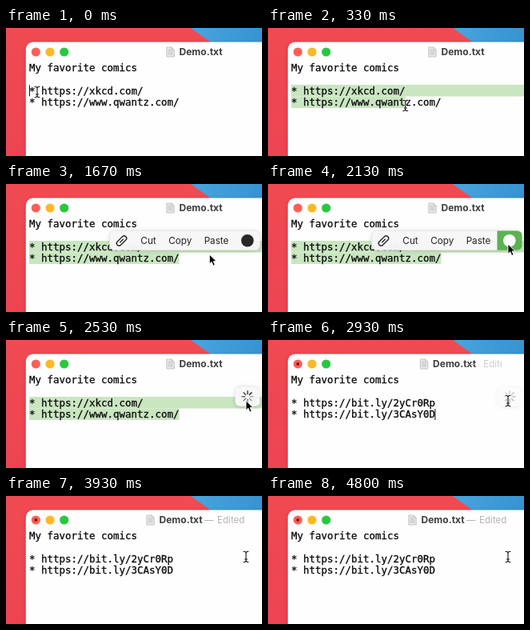
Write an HTML page that moves like this. It is 320 by 160 pixels and loops after 4.87 s.

```html
<!DOCTYPE html>
<html lang="en">
<head>
<meta charset="utf-8">
<title>Shorten links in a text file</title>
<style>
  html, body { margin: 0; width: 100%; height: 100%; overflow: hidden; background: #fff; }
  svg { display: block; width: 100vw; height: 100vh; }
  text { white-space: pre; }
  .mono { font: 12.46px "DejaVu Sans Mono", monospace; fill: #0a0a0a; stroke: #0a0a0a; stroke-width: .3px; }
  .title { font: 700 12px Inter, sans-serif; fill: #3d3d3d; }
  .edited { font: 400 11.6px Inter, sans-serif; fill: #b3b3b3; }
  .menu { font: 400 11.7px Inter, sans-serif; fill: #1c1c1c; text-anchor: middle; }
</style>
</head>
<body>
<svg viewBox="0 0 320 160">
  <defs>
    <linearGradient id="red" x1="0" y1="0" x2="0" y2="1">
      <stop offset="0" stop-color="#f04a52"/>
      <stop offset="1" stop-color="#ee4452"/>
    </linearGradient>
    <linearGradient id="blue" x1="0" y1="0" x2="1" y2="0">
      <stop offset="0" stop-color="#48a5dc"/>
      <stop offset="1" stop-color="#3793d3"/>
    </linearGradient>
    <filter id="soft" x="-20%" y="-40%" width="140%" height="190%">
      <feGaussianBlur stdDeviation="3"/>
    </filter>
    <clipPath id="editedClip"><rect id="editedBox" y="18" height="24"/></clipPath>
  </defs>

  <rect width="320" height="160" fill="url(#red)"/>
  <path d="M231 0H320V30H273Z" fill="url(#blue)"/>
  <rect x="25" y="19" width="330" height="180" rx="10" fill="#000" opacity=".18" filter="url(#soft)"/>
  <rect x="24.8" y="17.6" width="330" height="180" rx="9" fill="#fefefe"/>

  <circle cx="37.3" cy="30" r="5.6" fill="#fe5f57"/>
  <circle cx="55" cy="30" r="5.6" fill="#fdb827"/>
  <circle cx="72.7" cy="30" r="5.6" fill="#28c840"/>
  <circle id="dirty" cx="37.3" cy="30" r="1.9" fill="#7d1410"/>

  <g id="title">
    <path d="M.8 24H7L10.2 27.2V36H.8Z" fill="#ececec" stroke="#b5b5b5" stroke-width=".8"/>
    <path d="M7 24V27.2H10.2" fill="none" stroke="#b5b5b5" stroke-width=".7"/>
    <path d="M2.5 27H6M2.5 29H8.5M2.5 31H8.5M2.5 33H8.5" stroke="#aaa" stroke-width=".7"/>
    <text class="title" x="16.5" y="34.3">Demo.txt</text>
  </g>
  <g id="suffix" class="edited" clip-path="url(#editedClip)">
    <text x="248" y="34.3">—</text>
    <text id="edited" y="34.3">Edited</text>
  </g>

  <g fill="#c9e6c0">
    <rect id="selA" x="29" y="71" height="14.5"/>
    <rect id="selB" x="29" y="85.5" height="14.5"/>
  </g>
  <text class="mono" x="29" y="54">My favorite comics</text>
  <text class="mono" id="lineA" x="29" y="82.7"></text>
  <text class="mono" id="lineB" x="29" y="97"></text>
  <rect id="caret" width="1" height="14" fill="#111"/>

  <g id="popup">
    <rect x="130" y="59.5" width="187" height="24" rx="6" fill="#000" opacity=".2" filter="url(#soft)"/>
    <rect x="129.5" y="58.5" width="188" height="24.3" rx="6" fill="#f7f7f7" stroke="#dedede" stroke-width=".5"/>
    <g transform="translate(144.5 71) rotate(-45)" fill="none" stroke="#222" stroke-width="1.4" stroke-linecap="round">
      <path d="M1.5 -3H-4.5A3 3 0 0 0 -4.5 3H-2"/>
      <path d="M-1.5 3H4.5A3 3 0 0 0 4.5 -3H2.6"/>
      <path d="M-2.6 0H2.6"/>
    </g>
    <text class="menu" x="178" y="75.2">Cut</text>
    <text class="menu" x="217.8" y="75.2">Copy</text>
    <text class="menu" x="263" y="75.2">Paste</text>
    <path id="button" d="M286.5 58.5H311.5A6 6 0 0 1 317.5 64.5V76.8A6 6 0 0 1 311.5 82.8H286.5Z" fill="#58b04c"/>
    <circle id="mark" cx="301.8" cy="70.8" r="7.8"/>
  </g>

  <g id="busy">
    <rect x="287" y="59.5" width="30" height="24" rx="6" fill="#000" opacity=".2" filter="url(#soft)"/>
    <rect x="286.5" y="58.5" width="31" height="24.3" rx="6" fill="#f7f7f7"/>
    <g id="rays" transform="translate(302 70.8)" stroke="#333" stroke-width="1.5" stroke-linecap="round"></g>
  </g>

  <g id="beam" fill="none" stroke-linecap="round">
    <path d="M-3 -6.7Q0 -6.7 0 -4.5Q0 -6.7 3 -6.7M0 -5V5M-3 6.7Q0 6.7 0 4.5Q0 6.7 3 6.7M-1.5 3H1.5" stroke="#fff" stroke-width="2.4" opacity=".8"/>
    <path d="M-3 -6.7Q0 -6.7 0 -4.5Q0 -6.7 3 -6.7M0 -5V5M-3 6.7Q0 6.7 0 4.5Q0 6.7 3 6.7M-1.5 3H1.5" stroke="#111" stroke-width="1.1"/>
  </g>
  <path id="arrow" d="M0 0V12L2.8 9.5L4.8 14.2L7 13.2L5 8.7H8.8Z" fill="#000" stroke="#fff" stroke-width=".9" stroke-linejoin="round"/>
</svg>
<script>
const LOOP = 4870, STEP = 1000 / 15;
const LEFT = 29, CHAR = 7.5;
const SHOW = 930, HOVER = 1800, CLICK = 2400, SWAP = 2733, SLIDE = 2800;
const RAYS = 8;
const links = {
  long: ["* https://xkcd.com/", "* https://www.qwantz.com/"],
  short: ["* https://bit.ly/2yCr0Rp", "* https://bit.ly/3CAsY0D"]
};
// time, x, y of the mouse
const path = [
  [0, 39, 80], [70, 39, 80], [330, 171, 97], [530, 218.5, 97], [1500, 218.5, 97],
  [1600, 240, 92], [1880, 300, 75], [2800, 300, 76], [LOOP, 300, 76]
];

const $ = id => document.getElementById(id);
const set = (id, attrs) => {
  for (const k in attrs) $(id).setAttribute(k, attrs[k]);
};
const ramp = (t, a, b) => Math.min(1, Math.max(0, (t - a) / (b - a)));
const ease = p => p * p * (3 - 2 * p);
const show = (id, on) => set(id, { opacity: +on });

for (let i = 0; i < RAYS; i++) {
  const ray = document.createElementNS("http://www.w3.org/2000/svg", "path");
  ray.setAttribute("d", "M0 -3.4V-7");
  ray.setAttribute("transform", `rotate(${i * 360 / RAYS})`);
  $("rays").append(ray);
}

function mouseAt(t) {
  const i = Math.max(1, path.findIndex(k => k[0] >= t));
  const [a, b] = [path[i - 1], path[i]];
  const p = ramp(t, a[0], b[0]);
  return [a[1] + (b[1] - a[1]) * p, a[2] + (b[2] - a[2]) * p];
}

function drawText(t, x, y) {
  const swapped = t >= SWAP;
  const [a, b] = swapped ? links.short : links.long;
  $("lineA").textContent = a;
  $("lineB").textContent = b;

  const cols = Math.min(b.length, Math.max(0, Math.floor((x - LEFT) / CHAR)));
  const picked = t >= 100 && !swapped;
  const second = t >= 530 || y > 85.5;
  const width = (t >= 530 ? b.length : cols) * CHAR;
  set("selA", { width: !picked ? 0 : second ? 320 - LEFT : width });
  set("selB", { width: picked && second ? width : 0 });

  const blink = t >= SLIDE && Math.floor((t - SLIDE - 30) / 570) % 2 === 0;
  const end = LEFT + b.length * CHAR;
  set("caret", swapped ? { x: end - .6, y: 86 } : { x: LEFT, y: 71.3 });
  show("caret", t < 70 || blink);
}

function drawTitle(t) {
  const p = ease(ramp(t, SLIDE, 3100));
  set("title", { transform: `translate(${200 - 25 * p} 0)` });
  set("suffix", { opacity: Math.min(1, p * 1.6) });
  set("edited", { x: 264 + 9 * (1 - p) });
  set("editedBox", { x: 247, width: p ? 40 + 14 * p : 0 });
  show("dirty", t >= SWAP);
}

function drawPopup(t) {
  const work = ramp(t, CLICK, CLICK + 130);
  set("popup", { opacity: ramp(t, SHOW - 70, SHOW + 90) * .97 * (1 - work) });
  const hover = t >= HOVER;
  show("button", hover);
  set("mark", { fill: hover ? "#fff" : "#222" });

  set("busy", { opacity: work * (1 - ramp(t, SWAP, 3050)) });
  const head = Math.floor(t / 100);
  [...$("rays").children].forEach((ray, i) => {
    const age = (head - i + RAYS * 100) % RAYS;
    ray.setAttribute("opacity", 1 - .7 * age / RAYS);
  });
}

function draw(t) {
  const [x, y] = mouseAt(t);
  drawText(t, x, y);
  drawTitle(t);
  drawPopup(t);
  const arrow = t >= 1560 && t < 2860;
  const at = { transform: `translate(${x} ${y})` };
  set("beam", at);
  set("arrow", at);
  show("beam", !arrow);
  show("arrow", arrow);
}

const start = performance.now();
function tick() {
  const t = (performance.now() - start) % LOOP;
  draw(Math.floor((t + 5) / STEP) * STEP);
  requestAnimationFrame(tick);
}
draw(0);
requestAnimationFrame(tick);
</script>
</body>
</html>
```
